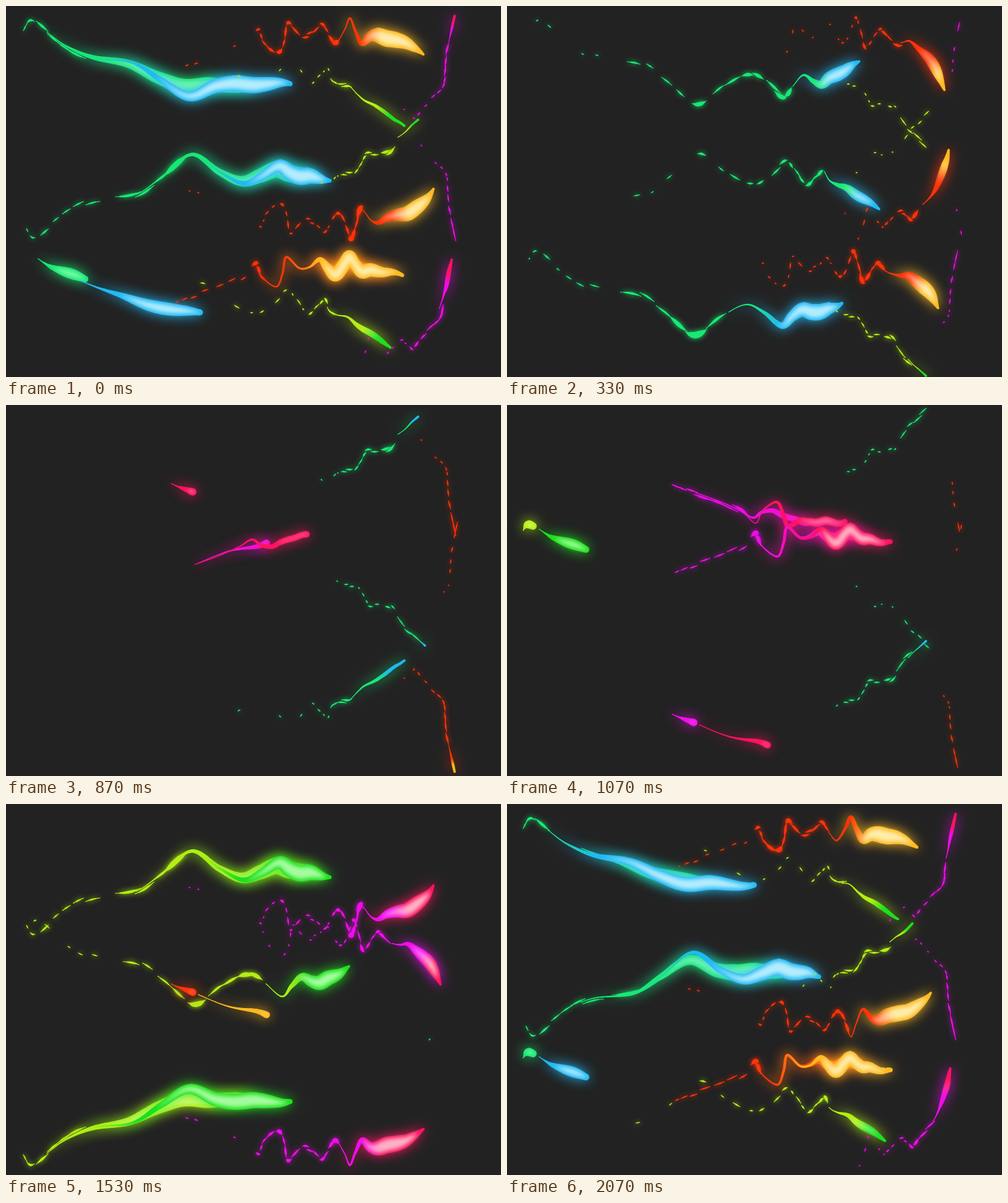
Write an HTML page with a canvas that moves like this. It is 800 by 600 pixels and loops after 2.14 s.

```html
<!DOCTYPE html>
<html lang="en">
<head>
<meta charset="utf-8">
<title>Flames</title>
<style>
html, body { margin: 0; width: 100%; height: 100%; overflow: hidden; background: #222; }
canvas { display: block; }
</style>
</head>
<body>
<canvas id="stage" width="800" height="600"></canvas>
<script>
const ctx = document.getElementById('stage').getContext('2d');
const LOOP = 2140, STEPS = 32;
const FINE = 50;       // samples per path segment
const SPREAD = 2.5;    // segments averaged on each side for the calm path

const clamp = (v, lo = 0, hi = 1) => Math.max(lo, Math.min(hi, v));
const ease = t => { t = clamp(t); return t * t * (3 - 2 * t); };
const hash = n => { const v = Math.sin(n * 12.9898 + 4.1) * 43758.5453; return v - Math.floor(v); };

// Linear interpolation through [age, value] keys
function keyed(keys, age) {
  let i = 1;
  while (i < keys.length - 1 && keys[i][0] < age) i++;
  const [a, u] = keys[i - 1], [b, v] = keys[i];
  return u + (v - u) * clamp((age - a) / (b - a));
}

function spline(pts, pos) {
  const last = pts.length - 1, i = Math.min(Math.floor(pos), last - 1), t = pos - i;
  const at = n => pts[clamp(n, 0, last)];
  const a = at(i - 1), b = at(i), c = at(i + 1), d = at(i + 2);
  return b.map((v, m) => v + t / 2 * (c[m] - a[m] +
    t * (2 * a[m] - 5 * v + 4 * c[m] - d[m] + t * (3 * (v - c[m]) + d[m] - a[m]))));
}

// Smoke leaves the head on a calm path and winds up on the curled one.
// head and tail give positions along the path, counted in segments.
function makeKind(kind) {
  const end = kind.path.length - 1;
  kind.end = end;
  kind.curled = [];
  kind.calm = [];
  for (let n = 0; n <= end * FINE; n++) {
    const pos = n / FINE, reach = Math.min(SPREAD, pos, end - pos);
    const sum = [0, 0];
    for (let j = -5; j <= 5; j++) {
      const p = spline(kind.path, clamp(pos + j / 5 * reach, 0, end));
      sum[0] += p[0] / 11;
      sum[1] += p[1] / 11;
    }
    kind.curled.push(spline(kind.path, pos));
    kind.calm.push(sum);
  }
  return kind;
}

const stream = makeKind({
  path: [[26,8], [39,-8], [66,12], [98,36], [140,54], [205,61], [250,90], [300,128], [345,100],
    [385,80], [415,92], [446,117], [462,100], [480,79], [497,92], [511,105], [521,85], [535,76],
    [556,76], [570,60], [579,45], [597,44], [618,39], [640,11], [657,-3], [677,-21]],
  head: [[0,1], [1,3.4], [2,7.4], [4,12], [5,14.7], [7,17.2], [11,21], [18,25]],
  tail: [[0,0], [1,1.4], [2,3.4], [3,2], [5,5.1], [7,8.3], [9,12], [11,15.2], [15,18], [16,22], [20,25]],
  windUp: 8, width: 28, peak: 5, rise: 6, fall: 8, neck: 0
});

const hook = makeKind({
  path: [[267,0], [285,8], [305,15], [345,29], [380,46], [402,64], [413,44], [437,28], [447,50],
    [453,76], [474,58], [491,60], [507,72], [520,58], [533,45], [547,65], [556,86], [564,65],
    [575,36], [590,56], [602,65], [618,48], [637,41], [652,56], [667,38], [688,19], [702,4],
    [707,-20], [710,-45], [716,-70], [725,-111]],
  head: [[0,1.6], [1,6.4], [3,15.2], [5,21], [7,23.6], [9,25.2], [18,30]],
  tail: [[0,0], [1,2], [2,2], [3,4], [6,6.2], [7,13], [9,15.4], [11,20.6], [13,22], [16,25.3], [20,30]],
  windUp: 10, width: 27, peak: 7, rise: 5, fall: 9, neck: 0.85
});

function ribbon(kind, age) {
  const head = keyed(kind.head, age), tail = keyed(kind.tail, age), pts = [];
  const bell = (age - kind.peak) / (age < kind.peak ? kind.rise : kind.fall);
  const cap = Math.max(4, 12 - age);
  const girth = Math.max(0, kind.width * Math.exp(-bell * bell) - cap * 0.6);
  for (let n = Math.ceil(tail * FINE); n <= head * FINE; n++) {
    const pos = n / FINE, u = (pos - tail) / (head - tail), behind = head - pos;
    const wind = ease(behind / kind.windUp);
    const a = kind.calm[n], b = kind.curled[n];
    const pinch = kind.neck * clamp((behind - 3) / 6) * (0.5 + 0.5 * Math.cos((pos - 10.5) * Math.PI / 3.5));
    const bulge = Math.sin(Math.PI * u ** 1.6) ** 1.2 || 0;
    const w = 1.5 * (1 - u) + cap * u * u + girth * bulge * (1 - pinch);
    pts.push([a[0] + (b[0] - a[0]) * wind, a[1] + (b[1] - a[1]) * wind, w]);
  }
  return pts;
}

// Behind the tail the curled path breaks into shrinking dashes, thickest in the bends.
function chips(kind, age) {
  const all = [];
  for (let slot = 0; slot < kind.end * 1.6; slot++) {
    const mid = (slot + 0.2 + 0.6 * hash(slot)) / 1.6;
    let freed = 3;
    while (freed < 20 && keyed(kind.tail, freed) < mid) freed += 0.25;
    const past = age - freed, left = 1 - past / (4 + 4 * hash(slot + 50));
    if (past < 0 || left <= 0) continue;
    const half = 0.04 + 0.36 * left ** 1.5, pts = [];
    const n0 = Math.max(0, Math.round((mid - half) * FINE));
    const n1 = Math.min(kind.end * FINE, Math.round((mid + half) * FINE));
    const m = clamp(Math.round(mid * FINE), 0, kind.end * FINE);
    const bend = Math.abs(kind.curled[m][1] - kind.calm[m][1]) / 30;
    const thick = 2.2 + 8 * bend * left * left;
    const shift = 2 * past, lift = 8 * (hash(slot + 90) - 0.5);
    for (let n = n0; n <= n1; n++) {
      const [x, y] = kind.curled[n];
      pts.push([x + shift, y + lift, thick * Math.sin(Math.PI * (n - n0) / (n1 - n0 || 1))]);
    }
    all.push(...pts);
  }
  return all;
}

function paint(pts, style, inset = 0) {
  ctx.fillStyle = style;
  ctx.beginPath();
  for (const [x, y, w] of pts) {
    const r = inset ? w / 2 - inset : Math.max(0.7, w / 2);
    if (r <= 0) continue;
    ctx.moveTo(x + r, y);
    ctx.arc(x, y, r, 0, 7);
  }
  ctx.fill();
}

function glow(color, size) {
  ctx.shadowColor = color;
  ctx.shadowBlur = size;
}

// The tail of an ageing ribbon cools to the back colour.
function blend(pts, share, tail, head) {
  if (share <= 0) return head;
  if (share >= 1) return tail;
  const a = pts[0], b = pts[pts.length - 1];
  const g = ctx.createLinearGradient(a[0], a[1], b[0], b[1]);
  g.addColorStop(Math.max(0, share - 0.12), tail);
  g.addColorStop(share + 0.12, head);
  return g;
}

function drawRibbon(kind, age, skin, cool) {
  if (age < 0 || age > 19) return;
  const pts = ribbon(kind, age);
  if (pts.length < 2) return;
  const share = cool ? 1 : age < 3 ? 0 : Math.min(0.62, 0.12 + 0.05 * (age - 3));
  glow((share > 0.55 ? skin.back : skin.front)[0], 20);
  paint(pts, blend(pts, share, skin.back[0], skin.front[0]));
  glow('transparent', 0);
  ctx.save();
  ctx.filter = 'blur(3px)';
  ctx.globalAlpha = 0.9;
  paint(pts, blend(pts, share, skin.back[1], skin.front[1]), 4);
  ctx.restore();
}

// front / back: edge colour and hot centre
const ice = { front: ['#1fb9f5', '#c4f2ff'], back: ['#18e874', '#8affae'] };
const leaf = { front: ['#1ce01c', '#b4ffae'], back: ['#b4ee14', '#eaff8c'] };
const fire = { front: ['#ffb91e', '#fff2b8'], back: ['#ff3208', '#ff9a78'] };
const rose = { front: ['#ff125e', '#ffc2d0'], back: ['#f00cec', '#ff7cf2'] };

// kind, colours, height, up or down, first step
const flames = [
  [stream, ice, 30, 1, 28], [stream, ice, 368, -1, 26], [stream, ice, 403, 1, 30],
  [stream, leaf, 204, -1, 17], [stream, leaf, 195, 1, 15], [stream, leaf, 577, -1, 19],
  [hook, fire, 104, -1, 24], [hook, fire, 291, 1, 22], [hook, fire, 482, -1, 26],
  [hook, rose, 127, 1, 13], [hook, rose, 273, -1, 11], [hook, rose, 500, 1, 15]
];

function draw(step) {
  glow('transparent', 0);
  ctx.fillStyle = '#222';
  ctx.fillRect(0, 0, 800, 600);
  for (const [kind, skin, y, side, start] of flames) {
    const age = (step - start + STEPS) % STEPS;
    ctx.save();
    ctx.translate(0, y);
    ctx.scale(1, side);
    glow(skin.back[0], 8);
    paint(chips(kind, age), skin.back[0]);
    if (age < 7) drawRibbon(kind, age - 1, skin, true);
    drawRibbon(kind, age, skin, false);
    ctx.restore();
  }
}

const stepStart = n => Math.round(n * 20 / 3) * 10;
const origin = performance.now();
let shown = -1;

function tick() {
  const t = (performance.now() - origin) % LOOP;
  let step = STEPS - 1;
  while (stepStart(step) > t) step--;
  if (step !== shown) draw(shown = step);
  requestAnimationFrame(tick);
}
tick();
</script>
</body>
</html>
```
